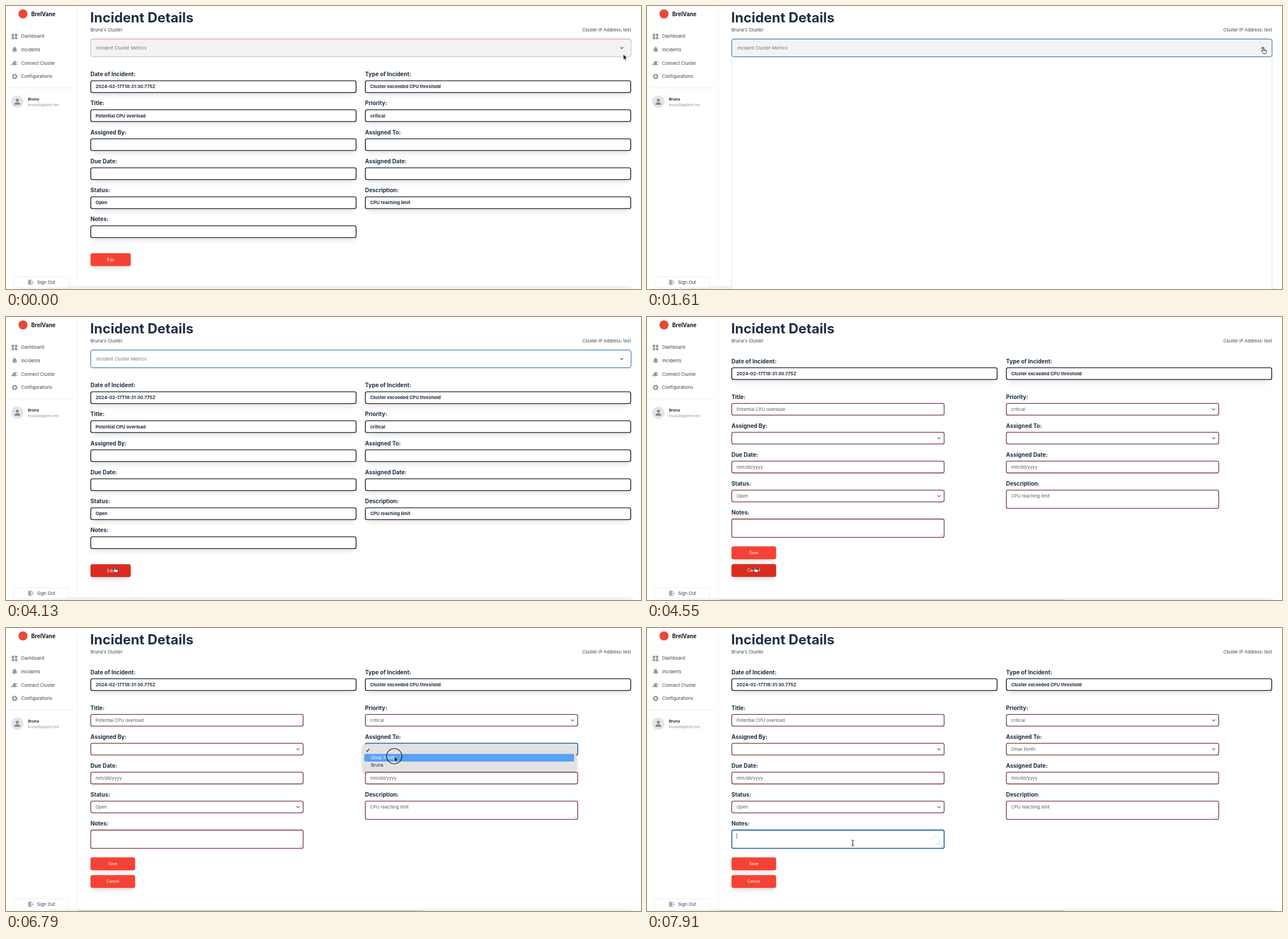
These frames come from a looping animation (1120x500 px, 8000 ms). An HTML page:

```html
<!DOCTYPE html>
<html lang="en">
<head>
<meta charset="utf-8">
<title>Incident Details</title>
<style>
  html, body { margin: 0; width: 100%; height: 100%; overflow: hidden; background: #fff; }
  svg { display: block; width: 1120px; height: 500px; }
  text { font-family: Inter, "Liberation Sans", sans-serif; white-space: pre; }
</style>
</head>
<body>
<svg id="stage" viewBox="0 0 1120 500"></svg>
<script>
const LOOP = 8000, STEP = 70;
const INK = '#1f2f43', BODY = '#374151', FIELD = '#555b63', RED = '#f44336', RED_HOVER = '#d92c1f';
const MAROON = '#78333a', BLUE = '#2f69b3';
const LEFT = 149.5, RIGHT = 633.8;
const stage = document.getElementById('stage');

function add(parent, tag, attrs = {}) {
  const node = document.createElementNS('http://www.w3.org/2000/svg', tag);
  set(node, attrs);
  return parent.appendChild(node);
}
function set(node, attrs) {
  for (const key in attrs) node.setAttribute(key, attrs[key]);
}
const show = (node, on) => node.style.display = on ? '' : 'none';
const group = (parent = stage) => add(parent, 'g');
const rect = (p, x, y, width, height, rx, attrs) => add(p, 'rect', { x, y, width, height, rx, ...attrs });
const path = (p, d, attrs) => add(p, 'path', { d, fill: 'none', ...attrs });
const circle = (p, cx, cy, r, attrs) => add(p, 'circle', { cx, cy, r, ...attrs });

// cy is the middle of the capitals
function label(p, str, x, cy, size, fill, weight = 400, anchor = 'start') {
  const node = add(p, 'text', {
    x, y: cy + size * 0.364, fill, 'font-size': size, 'font-weight': weight, 'text-anchor': anchor
  });
  node.textContent = str;
  return node;
}
function shadow(p, x, y, w, h) {
  rect(p, x + 3, y + 11, w - 6, h - 6, 3, { fill: '#000', opacity: 0.09 }).style.filter = 'blur(5px)';
  rect(p, x + 3, y + 7, w - 6, h - 6, 3, { fill: '#000', opacity: 0.08 }).style.filter = 'blur(2.5px)';
}
function chevron(p, x, y, stroke = '#666') {
  return path(p, `M${x - 2.8} ${y - 1.4}l2.8 2.8l2.8-2.8`, { stroke, 'stroke-width': 1.2 });
}
function heading(p, str, x, cy) {
  label(p, str, x - 0.5, cy, 9.88, INK, 700);
}
function readOnly(p, title, value, x, cy) {
  heading(p, title, x, cy);
  const y = cy + 11.6;
  shadow(p, x, y, 468, 20.8);
  rect(p, x, y, 468, 20.8, 3, { fill: '#fff', stroke: '#16181c', 'stroke-width': 1.4 });
  label(p, value, x + 8.6, cy + 22, 7.86, INK, 700);
}
function input(p, title, value, x, cy, kind) {
  heading(p, title, x, cy);
  const y = cy + 11.4, h = kind === 'area' ? 32.4 : 20.8;
  const box = rect(p, x, y, 374.6, h, 3, { fill: '#fff', stroke: MAROON, 'stroke-width': 1.3 });
  const text = label(p, value, x + 8.4, cy + 21.8, 7.82, FIELD);
  if (kind === 'select') chevron(p, x + 365.5, cy + 21.8);
  if (kind === 'area') {
    path(p, `M${x + 368} ${y + h - 2}l4.5-4.5m-2 4.5l2-2`, { stroke: '#888', 'stroke-width': 0.6 });
  }
  return { box, text };
}
function button(p, str, y, w) {
  shadow(p, 149, y, w, 22.8);
  const box = rect(p, 149, y, w, 22.8, 3.5, { fill: RED });
  label(p, str, 149 + w / 2, y + 11.4, 6.95, '#fff', 400, 'middle');
  return box;
}

// Page foot
const footView = rect(stage, 60, 494.4, 1057, 40, 26, { fill: '#f1f1f1' });
const footEdit = group();
rect(footEdit, 60, 496.6, 1057, 40, 20, { fill: '#f2f2f2' });
path(footEdit, 'M127 499.5H735', { stroke: '#c6c6c6' });

// View form
const view = group();
const viewRows = [
  ['Date of Incident:', '2024-02-17T18:31:30.775Z', 'Type of Incident:', 'Cluster exceeded CPU threshold'],
  ['Title:', 'Potential CPU overload', 'Priority:', 'critical'],
  ['Assigned By:', '', 'Assigned To:', ''],
  ['Due Date:', '', 'Assigned Date:', ''],
  ['Status:', 'Open', 'Description:', 'CPU reaching limit'],
  ['Notes:', '']
];
viewRows.forEach(([a, av, b, bv], i) => {
  const cy = 120.5 + i * 51.25;
  readOnly(view, a, av, LEFT, cy);
  if (b) readOnly(view, b, bv, RIGHT, cy);
});
const editButton = button(view, 'Edit', 436.8, 71);

// Metrics accordion
const accordion = group();
const panel = rect(accordion, 149.5, 60, 953, 30, 4, { fill: '#fff', stroke: '#ddd', 'stroke-width': 0.8 });
const header = rect(accordion, 149.5, 58.3, 953, 31.4, 4, { 'stroke-width': 1.2 });
const topEdge = path(accordion, 'M149.5 63V62.3a4 4 0 0 1 4-4H1098.5a4 4 0 0 1 4 4V63', { stroke: '#f5988f' });
label(accordion, 'Incident Cluster Metrics', 159.3, 74, 7.9, '#777');
const arrowDown = chevron(accordion, 1086, 74, '#555');

// Edit form
const edit = group();
readOnly(edit, 'Date of Incident:', viewRows[0][1], LEFT, 78);
readOnly(edit, 'Type of Incident:', viewRows[0][3], RIGHT, 78);
input(edit, 'Title:', 'Potential CPU overload', LEFT, 141.2);
input(edit, 'Priority:', 'critical', RIGHT, 141.2, 'select');
input(edit, 'Assigned By:', '', LEFT, 192.2, 'select');
const assignee = input(edit, 'Assigned To:', '', RIGHT, 192.2, 'select');
input(edit, 'Due Date:', 'mm/dd/yyyy', LEFT, 243.3);
input(edit, 'Assigned Date:', 'mm/dd/yyyy', RIGHT, 243.3);
input(edit, 'Status:', 'Open', LEFT, 294.4, 'select');
input(edit, 'Description:', 'CPU reaching limit', RIGHT, 294.4, 'area');
const notes = input(edit, 'Notes:', '', LEFT, 345.6, 'area');
const caret = path(edit, 'M158.2 362.5V372', { stroke: '#333', 'stroke-width': 0.8 });
const bubble = path(edit, 'M502.5 375.5a7 7 0 1 1 7 7h7v-7', { stroke: '#d4d4d4', 'stroke-width': 0.8 });
button(edit, 'Save', 405.3, 78.8);
const cancelButton = button(edit, 'Cancel', 436.5, 78.8);

// Open list of assignees
const list = group();
rect(list, 629, 207, 377, 49, 4, { fill: '#000', opacity: 0.22 }).style.filter = 'blur(2.5px)';
rect(list, 628.8, 205.5, 376.8, 48.3, 4, { fill: '#e2e2e2' });
const highlight = rect(list, 632, 209, 370, 13.4, 2.5, { fill: '#57a1f6' });
const tick = path(list, 'M635.6 216l1.7 2.3l3.4-5', { 'stroke-width': 1.1 });
const firstName = label(list, 'Omar Fenth', 643.7, 229.2, 7.85, '#333');
label(list, 'Bruna', 643.7, 242.6, 7.85, '#333');

// Top bar and sidebar
label(stage, 'Incident Details', 148.6, 20, 24, INK, 700);
label(stage, "Bruna's Cluster", 149, 42, 7.78, BODY);
label(stage, 'Cluster IP Address: test', 1102.5, 42, 7.78, BODY, 400, 'end');

const side = group();
path(side, 'M125.5 0V500', { stroke: '#f3f3f3' });
path(side, 'M5 144.7H118', { stroke: '#ececec' });
circle(side, 30, 14, 8, { fill: '#e8483a' });
label(side, 'BrelVane', 44.6, 14.2, 9.7, '#15181d', 700);
['Dashboard', 'Incidents', 'Connect Cluster', 'Configurations'].forEach((name, i) => {
  label(side, name, 26.8, 53.6 + i * 23.6, 7.85, BODY);
});
const grey = { fill: '#999' };
for (const x of [10, 15.6]) for (const y of [49, 54.4]) rect(side, x, y, 4.4, 4.4, 0.8, grey);
path(side, 'M10.6 80.2q1.4-1.4 1.4-4a3.2 3.2 0 0 1 6.4 0q0 2.6 1.4 4zM13.7 81h3q-1.5 1.8-3 0zM14.6 73v-1.4h1.2V73z', grey);
path(side, 'M9 105q0-3 2.6-3q0-4.8 4.6-4.8h1.2v1.2h3v1.2h-3v2.6h3v1.2h-3v1.2q-4 .8-5.2-1.2q-1.8 0-1.8 1.6z', grey);
circle(side, 15.2, 124.5, 3, { fill: 'none', stroke: '#999', 'stroke-width': 2.2 });
circle(side, 15.2, 124.5, 4.5, { fill: 'none', stroke: '#999', 'stroke-width': 1.2, 'stroke-dasharray': '2 1.534' });
circle(side, 20, 169, 10.8, { fill: '#e3e4e6' });
circle(side, 20, 166.3, 2.6, { fill: '#85888d' });
path(side, 'M14.8 174.6q0-4.6 5.2-4.6t5.2 4.6z', { fill: '#85888d' });
label(side, 'Bruna', 38.7, 164.2, 6.7, INK, 700);
label(side, 'bruna48@demo.test', 38.7, 174.8, 5.7, '#8f949b');
rect(side, 13.5, 478.5, 97, 19.4, 2, { fill: '#fff', stroke: '#ececec', 'stroke-width': 0.9 });
label(side, 'Sign Out', 54.8, 488.2, 7.85, BODY);
path(side, 'M39 483.6h5v9h-5z', { fill: '#aaa' });
path(side, 'M44 484.4h2v2m0 3.6v2h-2M43 488.2h5.4m-1.6-1.6l1.6 1.6l-1.6 1.6', { stroke: '#999', 'stroke-width': 0.9 });

// Pointers
const ring = circle(stage, 0, 0, 10, { fill: 'none', stroke: '#111', 'stroke-width': 1.1 });
const pointer = group();
const shapes = {
  arrow: path(pointer, 'M0 0V9.2L2.1 7.3L3.6 10.8L5.1 10.2L3.6 6.8H6.4Z',
    { fill: '#000', stroke: '#fff', 'stroke-width': 0.6 }),
  hand: path(pointer, 'M-1 6.4V1a1 1 0 0 1 2 0V4.2a.9.9 0 0 1 1.7.2a.9.9 0 0 1 1.5.4a.8.8 0 0 1 1.3.8V7.6c0 1.5-.8 1.6-.8 2.9H.2C0 9.2-2.6 7.7-3.2 6.2c-.4-1 .8-1.6 1.4-.8z' +
    'M1 4.2V6M2.7 4.4V6M4.2 4.8V6.2', { fill: '#fff', stroke: '#111', 'stroke-width': 0.8 }),
  beam: path(pointer, 'M-2.4-5.2Q0-5.2 0-3.8Q0-5.2 2.4-5.2M0-3.8V3.8M-2.4 5.2Q0 5.2 0 3.8Q0 5.2 2.4 5.2M-1 1.5H1',
    { stroke: '#111', 'stroke-width': 0.9 })
};

const ease = {
  line: p => p,
  in: p => p ** 1.5,
  out: p => 1 - (1 - p) ** 2,
  both: p => (1 - Math.cos(Math.PI * p)) / 2
};
const moves = [
  [0, 1089, 85.5], [140, 1089, 85.5], [280, 1087, 73.5, 'line'], [2730, 1087, 73.5],
  [3570, 322, 336, 'both'], [4130, 192, 441, 'out'], [4970, 189, 440.5],
  [5600, 626.3, 251, 'in'], [5810, 687, 215, 'out'], [6300, 687, 215],
  [6650, 685.3, 227, 'out'], [6930, 685.3, 227], [7630, 363, 380, 'both'], [LOOP, 363, 380]
];
const looks = [[0, 'arrow'], [280, 'hand'], [2940, 'arrow'], [4060, 'hand'], [4830, 'arrow'], [7490, 'beam']];
const clicks = [
  [1400, 1540, 1085.5, 73.5, 18.5], [2520, 2660, 1085.5, 73.5, 18.5], [4270, 4410, 192, 444, 18.5],
  [6020, 6090, 687, 215, 13.8], [6790, 6930, 684.8, 226.5, 13.5], [7700, 7770, 363, 379.5, 10.5]
];

function pointerAt(t) {
  const i = moves.findIndex(m => m[0] > t);
  const [t0, x0, y0] = moves[i - 1], [t1, x1, y1, kind = 'line'] = moves[i];
  const p = ease[kind]((t - t0) / (t1 - t0));
  return [x0 + (x1 - x0) * p, y0 + (y1 - y0) * p];
}
const ramp = (t, a, b) => Math.min(1, Math.max(0, (t - a) / (b - a)));
const mix = (a, b, p) => `rgb(${a.map((v, i) => Math.round(v + (b[i] - v) * p))})`;
const within = (t, a, b) => t >= a && t < b;

function drawView(t) {
  const drop = within(t, 1540, 2660) ? (t < 1610 ? 200 : 440) : 0;
  const focus = ramp(t, 420, 630);
  view.setAttribute('transform', `translate(0 ${drop})`);
  set(panel, { height: 29 + drop });
  set(header, {
    fill: mix([243, 243, 243], [255, 255, 255], ramp(t, 2870, 3080)),
    stroke: mix([200, 200, 200], [58, 121, 188], focus)
  });
  topEdge.style.opacity = 1 - focus;
  arrowDown.setAttribute('transform', drop ? 'rotate(180 1086 74)' : '');
  set(editButton, { fill: mix([244, 67, 54], [217, 44, 31], ramp(t, 3990, 4130)) });
}
function drawEdit(t) {
  set(assignee.box, within(t, 6020, 7700)
    ? { stroke: BLUE, 'stroke-width': 1.8 } : { stroke: MAROON, 'stroke-width': 1.3 });
  set(notes.box, t >= 7700
    ? { stroke: BLUE, 'stroke-width': 1.8 } : { stroke: MAROON, 'stroke-width': 1.3 });
  assignee.text.textContent = t >= 6930 ? 'Omar Fenth' : '';
  set(cancelButton, { fill: t < 5110 ? RED_HOVER : RED });
  show(caret, t >= 7700);
  show(bubble, t >= 7910);
  const second = t >= 6510;
  set(highlight, { y: second ? 222.5 : 209 });
  set(tick, { stroke: second ? '#222' : '#fff' });
  set(firstName, { fill: second ? '#fff' : '#333' });
}
function draw(time) {
  const t = Math.floor(time / STEP) * STEP;
  const editing = t >= 4340;
  for (const node of [view, accordion, footView]) show(node, !editing);
  for (const node of [edit, footEdit]) show(node, editing);
  show(list, within(t, 6090, 6930));
  editing ? drawEdit(t) : drawView(t);

  const [x, y] = pointerAt(t);
  pointer.setAttribute('transform', `translate(${x} ${y})`);
  const look = looks.filter(l => l[0] <= t).pop()[1];
  for (const name in shapes) show(shapes[name], name === look);

  const click = clicks.find(c => within(t, c[0], c[1]));
  show(ring, click);
  if (click) set(ring, { cx: click[2], cy: click[3], r: click[4] });
}

const start = performance.now();
function tick60() {
  draw((performance.now() - start) % LOOP);
  requestAnimationFrame(tick60);
}
tick60();
</script>
</body>
</html>
```
